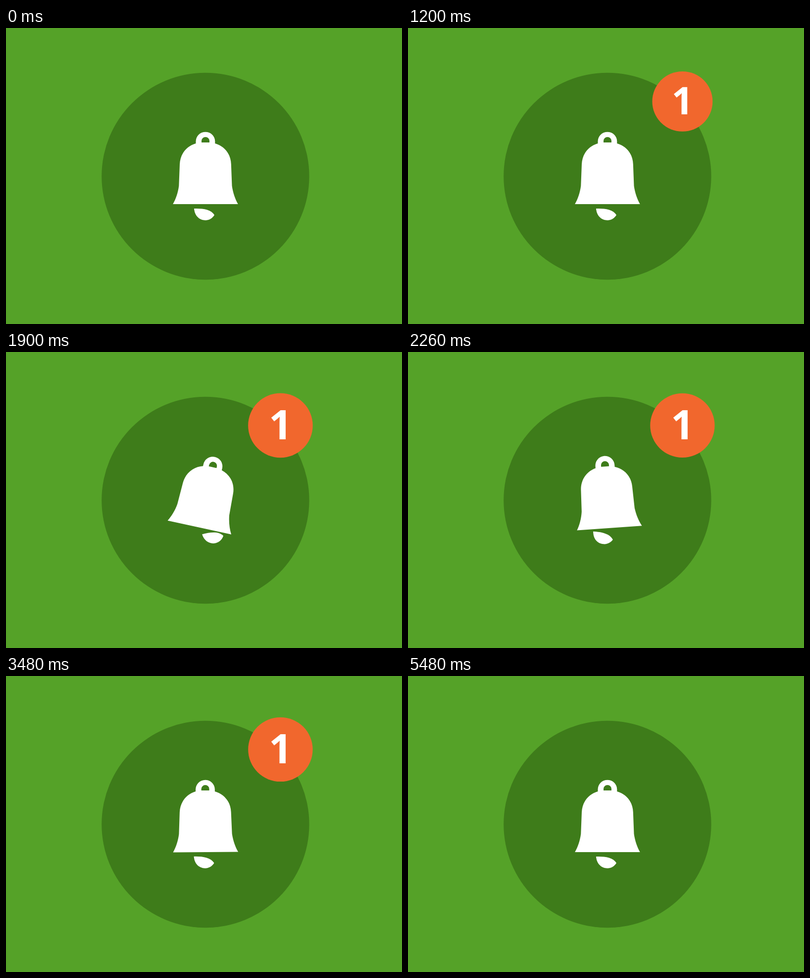
An HTML page for the animation above (5.78 s loop, 800 by 600 pixels).

```html
<!DOCTYPE html>
<html lang="en">
<head>
<meta charset="utf-8">
<title>Notification bell</title>
<style>
  html, body { margin: 0; width: 100%; height: 100%; overflow: hidden; background: #55a228; }
  svg { display: block; width: 800px; height: 600px; }
  text { font: bold 82px "Open Sans", sans-serif; text-anchor: middle; }
</style>
</head>
<body>
<svg viewBox="0 0 800 600" fill="#fff">
  <rect width="800" height="600" fill="#55a228"/>
  <circle cx="402.9" cy="300.5" r="209.7" fill="#3e7c1a"/>
  <path id="bell" fill-rule="evenodd" d="M383.5 234V230A19.4 19.4 0 0 1 422.3 230V234
    C440 239 454 254 454.8 276L456.5 320C458.5 334 463 347 468.7 357H337.2
    C343 347 347.5 334 349.3 320L351 276C352 254 366 239 383.5 234Z
    M395 232V229A8 8 0 0 1 411 229V232Z"/>
  <path id="clapper" d="M380 366C397 365.5 414 367.5 421 379
    C417 386 410 389.7 403 389.7C390 389.7 381 380 380 366Z"/>
  <g id="badge">
    <circle r="65.2" fill="#f1672d"/>
    <text y="28">1</text>
  </g>
</svg>
<script>
const LOOP = 5780;
const [bell, clapper, badge] = ['bell', 'clapper', 'badge'].map(id => document.getElementById(id));

// What is left of the way to the end value: a decaying oscillation from 1 to 0
const elasticRest = (p, period) => 2 ** (-10 * p) * Math.cos(2 * Math.PI * p / period);
const backIn = p => p * p * (2.70158 * p - 1.70158);
const easeOut = p => 1 - (1 - p) ** 2;

function swing(t) {
  const pull = 1255, release = 1555, peak = -28;
  if (t < pull || t > 4000) return 0;
  if (t < release) return peak * easeOut((t - pull) / (release - pull));
  return peak * elasticRest((t - release) / 3130, 0.2);
}

function badgeScale(t) {
  if (t < 690 || t >= 4580) return 0;
  if (t < 4080) return 1 - 0.5 * elasticRest((t - 690) / 1750, 0.3);
  return 1 - backIn((t - 4080) / 500);
}

function draw(now) {
  const t = now % LOOP;
  const scale = badgeScale(t);
  bell.setAttribute('transform', `rotate(${swing(t)} 403 300)`);
  clapper.setAttribute('transform', `rotate(${-swing(t - 22)} 403 300)`);
  badge.setAttribute('transform', `translate(554.4 148.9) scale(${scale})`);
  badge.setAttribute('visibility', scale > 0 ? 'visible' : 'hidden');
}

const start = performance.now();
function tick() {
  draw(performance.now() - start);
  requestAnimationFrame(tick);
}
tick();
</script>
</body>
</html>
```
